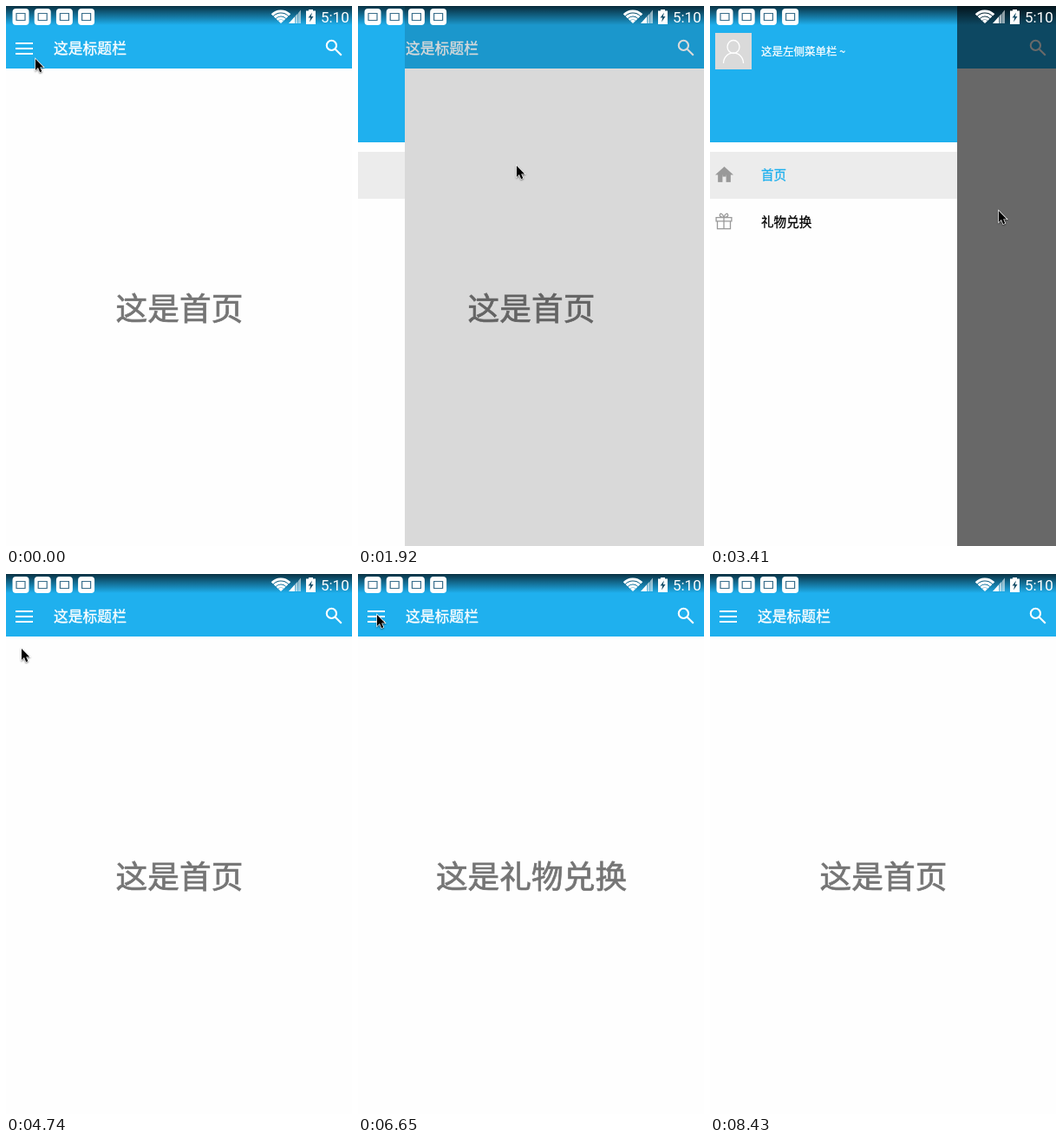
Write an HTML page with a canvas that moves like this. It is 399 by 622 pixels and loops after 8.73 s.

```html
<!DOCTYPE html>
<html lang="zh-CN">
<head>
<meta charset="utf-8">
<title>侧滑菜单</title>
<style>
html, body { margin: 0; width: 100%; height: 100%; overflow: hidden; background: #fefefe; }
canvas { display: block; width: 399px; height: 622px; }
</style>
</head>
<body>
<canvas id="stage" width="399" height="622"></canvas>
<script>
const ctx = document.getElementById('stage').getContext('2d');
const W = 399, H = 622, LOOP = 8730, STEPS = 59;
const STEP = LOOP / STEPS;
const BLUE = '#1fb0ee', PAPER = '#fefefe', GREY = '#999', WHITE = '#fff';
const CJK = '"Noto Sans CJK SC", "Noto Sans CJK JP", "Noto Sans CJK", sans-serif';
const DRAWER = 293, SETTLE = 600 / STEP, TRAVEL = 4;

// Times are in screen-refresh steps; each toggle opens or closes the drawer.
const toggles = [6.7, 11.84, 20.92, 28.84, 33.7, 40.6, 46.7, 53.92];
const [giftFrom, giftTo] = [toggles[5], toggles[7]];

// Where the pointer rests, and when it gets there.
const stops = [
  { at: 0, x: 34, y: 61 }, { at: 2, x: 18, y: 47 },
  { at: 13, x: 183, y: 184 }, { at: 18, x: 4, y: 235 },
  { at: 23, x: 333, y: 236 }, { at: 32, x: 18, y: 86 },
  { at: 39, x: 79, y: 253 }, { at: 45, x: 22, y: 47 },
  { at: 50, x: 82, y: 200 }, { at: 57, x: -30, y: 235 }
];

function rect(color, x, y, w, h) {
  ctx.fillStyle = color;
  ctx.fillRect(x, y, w, h);
}

// A hairline outline gives the glyphs a medium weight.
function text(str, x, middle, size, color, align = 'left') {
  const baseline = middle + size * 0.38;
  ctx.font = `${size}px ${CJK}`;
  ctx.textAlign = align;
  ctx.fillStyle = ctx.strokeStyle = color;
  ctx.lineWidth = size * 0.02;
  ctx.fillText(str, x, baseline);
  ctx.strokeText(str, x, baseline);
}

function at(x, y, scale, draw) {
  ctx.save();
  ctx.translate(x, y);
  ctx.scale(scale, scale);
  ctx.beginPath();
  draw();
  ctx.restore();
}

function stroke(color, width) {
  ctx.strokeStyle = color;
  ctx.lineWidth = width;
  ctx.stroke();
}

function polygon(color, ...points) {
  ctx.beginPath();
  points.forEach(([x, y]) => ctx.lineTo(x, y));
  ctx.closePath();
  ctx.fillStyle = color;
  ctx.fill();
}

function drawerSlide(step) {
  const done = toggles.filter(t => t <= step);
  if (!done.length) return 0;
  const left = Math.max(0, 1 - (step - done[done.length - 1]) / SETTLE) ** 5;
  return done.length % 2 ? 1 - left : left;
}

function pointerAt(step) {
  const i = stops.findIndex(s => s.at > step);
  if (i < 0) return stops[stops.length - 1];
  const a = stops[i - 1], b = stops[i];
  const time = Math.min(TRAVEL, b.at - a.at);
  const t = Math.max(0, 1 - (b.at - step) / time);
  const ease = t * t * (3 - 2 * t);
  return { x: a.x + (b.x - a.x) * ease, y: a.y + (b.y - a.y) * ease };
}

function searchIcon() {
  ctx.arc(6.2, 6.2, 5.6, 0, 2 * Math.PI);
  ctx.moveTo(10.5, 10.5);
  ctx.lineTo(17.6, 17.6);
  stroke(WHITE, 2.1);
}

function personIcon() {
  ctx.ellipse(21, 16, 7, 7.5, 0, 0, 2 * Math.PI);
  ctx.moveTo(32.5, 35);
  ctx.ellipse(21, 35, 11.5, 12, 0, 0, Math.PI, true);
  stroke(WHITE, 1.3);
}

function homeIcon() {
  polygon(GREY, [10, 0], [20, 9], [0, 9]);
  rect(GREY, 3, 8.5, 5, 8.5);
  rect(GREY, 12, 8.5, 5, 8.5);
  rect(GREY, 8, 8.5, 4, 2.5);
}

function giftIcon() {
  ctx.rect(0.6, 5.6, 17.8, 4.2);
  ctx.rect(2, 9.8, 15, 8.8);
  ctx.moveTo(9.5, 18.6);
  ctx.lineTo(9.5, 5.6);
  for (const side of [-1, 1]) {
    ctx.moveTo(9.5, 5.6);
    ctx.bezierCurveTo(9.5 + side * 9, 5.6, 9.5 + side * 3, -4, 9.5, 5.6);
  }
  stroke(GREY, 1.3);
}

function drawPage(gift) {
  rect(PAPER, 0, 0, W, H);
  rect(BLUE, 0, 0, W, 72);
  for (let i = 0; i < 3; i++) rect(WHITE, 11, 42 + i * 6, 20, 2);
  text('这是标题栏', 55, 49, 16.8, WHITE);
  at(369.2, 39.2, 1, searchIcon);
  text(gift ? '这是礼物兑换' : '这是首页', 200, 348, 36.7, '#757575', 'center');
}

function drawDrawer(slide, gift) {
  const edge = Math.round(slide * DRAWER);
  if (!edge) return;
  rect(`rgba(0,0,0,${slide * (0.82 - 0.22 * slide)})`, edge, 0, W - edge, H);
  ctx.save();
  ctx.translate(edge - DRAWER, 0);
  rect(PAPER, 0, 0, DRAWER, H);
  rect(BLUE, 0, 0, DRAWER, 157);
  rect('#dadada', 14, 31, 42, 42);
  at(14, 31, 1, personIcon);
  text('这是左侧菜单栏 ~', 67, 52, 12.5, WHITE);
  rect('#ececec', 0, gift ? 222 : 168, DRAWER, 54);
  at(14, 185, 1.05, homeIcon);
  at(14.5, 238, 1, giftIcon);
  text('首页', 67, 194.5, 14.6, gift ? '#000' : BLUE);
  text('礼物兑换', 67, 248, 14.6, gift ? BLUE : '#000');
  ctx.restore();
}

function drawWifi() {
  const arm = Math.PI * 0.257;
  ctx.lineWidth = 3;
  for (let r = 2; r < 15; r += 4) {
    ctx.beginPath();
    ctx.arc(317, 20, r, -Math.PI / 2 - arm, -Math.PI / 2 + arm);
    stroke(WHITE, r > 2 ? 3.2 : 4);
  }
}

function drawSignal() {
  const bar = (from, to, color) => polygon(color,
    [from, 20], [from, 20 - (from - 326) * 1.1], [to, 20 - (to - 326) * 1.1], [to, 20]);
  bar(326, 333, WHITE);
  bar(333.5, 336.5, 'rgba(255,255,255,.65)');
  bar(337, 340, 'rgba(255,255,255,.55)');
}

function drawBattery() {
  rect(WHITE, 349, 4, 5, 2);
  rect(WHITE, 346, 5.5, 11, 15.5);
  polygon('#174f69', [353, 7.5], [348.6, 13.5], [351.1, 13.5],
    [350.1, 18.5], [354.5, 12], [351.8, 12]);
}

function drawStatusBar() {
  const shade = ctx.createLinearGradient(0, 0, 0, 22);
  shade.addColorStop(0, 'rgba(0,0,0,.72)');
  shade.addColorStop(1, 'rgba(0,0,0,0)');
  rect(shade, 0, 0, W, 22);
  for (let i = 0; i < 4; i++) {
    at(7.5 + i * 25.2, 3, 1, () => {
      ctx.roundRect(0, 0, 19, 19, 4);
      ctx.fillStyle = WHITE;
      ctx.fill();
      ctx.beginPath();
      ctx.rect(4.5, 5.5, 10, 8);
      stroke('#3a6f8c', 1.2);
    });
  }
  drawWifi();
  drawSignal();
  drawBattery();
  ctx.font = '17px Roboto, sans-serif';
  ctx.textAlign = 'right';
  ctx.fillStyle = WHITE;
  ctx.fillText('5:10', 395.7, 19);
}

function drawPointer(step) {
  const { x, y } = pointerAt(step);
  at(Math.round(x), Math.round(y), 0.85, () => {
    ctx.shadowColor = 'rgba(0,0,0,.4)';
    ctx.shadowBlur = 2;
    ctx.shadowOffsetY = 1;
    polygon('#000', [0, 0], [0, 15.2], [3.5, 11.8], [6, 17.8], [8.6, 16.7], [6.1, 11.1], [10.8, 11.1]);
    stroke(WHITE, 1.6);
    ctx.shadowColor = 'transparent';
    ctx.fill();
  });
}

function render(now) {
  const step = Math.floor((now % LOOP) / STEP + 0.12) % STEPS;
  const gift = step >= giftFrom && step < giftTo;
  drawPage(gift);
  drawDrawer(drawerSlide(step), gift);
  drawStatusBar();
  drawPointer(step);
}

const start = performance.now();
function tick() {
  render(performance.now() - start);
  requestAnimationFrame(tick);
}
tick();
</script>
</body>
</html>
```
